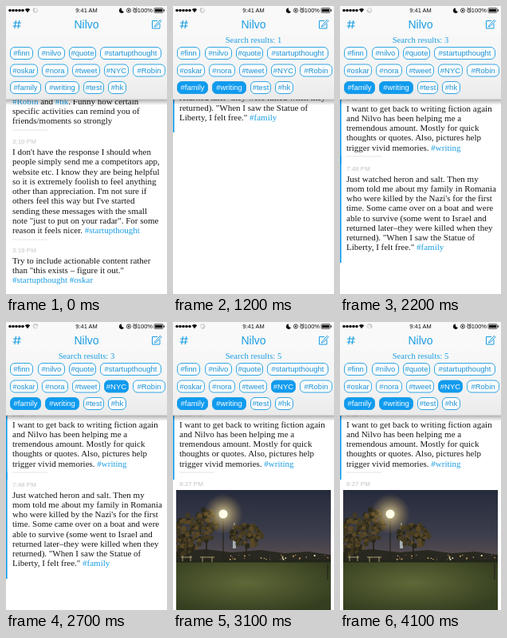
Recreate the animation shown at these times as an HTML page. Size 202 by 360 pixels, loop 4.2 s.

```html
<!DOCTYPE html>
<html lang="en">
<head>
<meta charset="utf-8">
<title>Tag search</title>
<style>
  html, body { margin: 0; width: 100%; height: 100%; overflow: hidden; background: #fff; }
  svg { display: block; width: 100vw; height: 100vh; }
  .body { font: 11px "Liberation Serif", serif; fill: #161616; }
  .time { font: 8px "Liberation Sans", sans-serif; fill: #c3c3c3; }
  .chip { font: 9.5px "Liberation Sans", sans-serif; text-anchor: middle; }
  .status { font: 7.5px "Liberation Sans", sans-serif; }
  .tag { fill: #1b9de2; }
</style>
</head>
<body>
<svg id="stage" viewBox="0 0 202 360">
  <defs>
    <linearGradient id="panel" x2="0" y2="1">
      <stop stop-color="#f8f8f8"/><stop offset=".6" stop-color="#f3f3f3"/><stop offset="1" stop-color="#eaeaea"/>
    </linearGradient>
    <linearGradient id="shade" x2="0" y2="1">
      <stop stop-color="#000" stop-opacity=".3"/><stop offset="1" stop-color="#000" stop-opacity="0"/>
    </linearGradient>
    <linearGradient id="sky" x2="0" y2="1">
      <stop stop-color="#262b3c"/><stop offset=".6" stop-color="#3b3d4b"/><stop offset="1" stop-color="#5c5050"/>
    </linearGradient>
    <radialGradient id="grass" cx=".45" cy=".45" r=".65">
      <stop stop-color="#5f6837"/><stop offset="1" stop-color="#343e20"/>
    </radialGradient>
    <radialGradient id="glow">
      <stop offset=".1" stop-color="#fffbe0"/><stop offset=".25" stop-color="#ffe9a0" stop-opacity=".75"/>
      <stop offset="1" stop-color="#d9a850" stop-opacity="0"/>
    </radialGradient>
    <clipPath id="photoClip"><path d="M4 210H198V360H4z"/></clipPath>
  </defs>

  <g id="feed"></g>
  <g id="familyOnly"></g>
  <g id="writing"></g>
  <g id="familyBelow"></g>
  <g id="photo">
    <g clip-path="url(#photoClip)">
      <path d="M4 210H198V300H4z" fill="url(#sky)"/>
      <path d="M4 287L40 284 75 288 110 285 140 289 170 287 198 291V302H4z" fill="#292820"/>
      <path d="M75 283V258L77 250 79 258V283z" fill="#a6aeb0"/>
      <g id="trees"></g>
      <path d="M4 298H198V360H4z" fill="url(#grass)"/>
      <path d="M4 299H198" stroke="#22251a" stroke-width="3"/>
      <g id="lights"></g>
      <path d="M63 239V298M194 302V322M18 270V298" stroke="#26231c" stroke-width="1.2"/>
      <circle cx="63" cy="240" r="25" fill="url(#glow)" opacity=".75"/>
      <circle cx="63" cy="240" r="5.5" fill="#fffce8"/>
      <path d="M10 294H24M34 294H52M12 292V299M22 292V299M37 294V300M49 294V300" stroke="#c7ba87" stroke-width=".8"/>
    </g>
  </g>

  <path d="M0 117H202V124H0z" fill="url(#shade)"/>
  <path d="M0 0H202V117H0z" fill="#f9f9f9"/>
  <path d="M0 35H202V117H0z" fill="url(#panel)"/>
  <path d="M0 116.5H202" stroke="#c5c5c5" stroke-width=".6"/>

  <g fill="#111">
    <circle cx="5" cy="5.5" r="1.8"/><circle cx="9" cy="5.5" r="1.8"/><circle cx="13" cy="5.5" r="1.8"/>
    <circle cx="17" cy="5.5" r="1.8"/><circle cx="21" cy="5.5" r="1.8"/>
    <path d="M23.8 4.2Q27 1.6 30.2 4.2L27 8.3z"/>
    <path d="M145 2.5A3.2 3.2 0 1 0 148 7A3.8 3.8 0 0 1 145 2.5z"/>
    <circle cx="154" cy="5.5" r="2.6" fill="none" stroke="#111" stroke-width=".8"/><circle cx="154" cy="5.5" r="1.1"/>
    <circle cx="162" cy="5.7" r="2.3" fill="none" stroke="#111" stroke-width=".8"/>
    <path d="M162 4V6H163.5M159.5 3L161 2M164.5 3L163 2" fill="none" stroke="#111" stroke-width=".7"/>
    <rect x="186" y="2.7" width="11" height="5.6" rx="1" fill="none" stroke="#111" stroke-width=".7"/>
    <path d="M187 3.7H196V7.3H187zM197.6 4.5H199V6.5H197.6z"/>
    <text class="status" x="101" y="8" text-anchor="middle">9:41 AM</text>
    <text class="status" x="184" y="8" text-anchor="end">100%</text>
  </g>
  <g id="spinner" stroke="#777" stroke-width=".7"></g>

  <text x="101" y="27.5" text-anchor="middle" class="tag" font-size="14" font-family="Liberation Sans, sans-serif">Nilvo</text>
  <g fill="none" stroke="#1b9de2" stroke-width="1.2">
    <path d="M12.5 18L10.8 28M16.8 18L15.1 28M9 21H19M8.5 25H18.5"/>
    <path d="M190 18.5H183.5V28H193V22M187 24.5L193.5 17.2L195 18.7L188.5 25.3L186.5 26z" stroke-width="1"/>
  </g>
  <text id="results" x="101" y="46.3" text-anchor="middle" class="tag" font-size="10.7" font-family="Liberation Serif, serif"></text>
  <g id="chips"></g>
</svg>

<script>
const byId = id => document.getElementById(id);
const LOOP = 4200, BLUE = "#109bef", LEADING = 12.25;

function add(parent, name, attrs, text = "") {
  const node = document.createElementNS("http://www.w3.org/2000/svg", name);
  for (const key in attrs) node.setAttribute(key, attrs[key]);
  node.textContent = text;
  parent.append(node);
  return node;
}

function addNote(group, time, y, lines) {
  if (time) add(group, "text", { class: "time", x: 8, y: y - 14 }, time);
  lines.forEach((line, i) => {
    const row = add(group, "text", { class: "body", x: 8, y: y + i * LEADING });
    for (const part of line.split(/(#\w+)/))
      add(row, "tspan", part[0] === "#" ? { class: "tag" } : {}, part);
  });
}

const addRule = (group, y) => add(group, "path", { d: `M8 ${y}H52`, stroke: "#ddd", "stroke-width": .8 });
const addBar = (group, top, bottom) => add(group, "path", { d: `M0 ${top}H1.6V${bottom}H0z`, fill: BLUE });

const familyNote = [
  "Just watched heron and salt. Then my",
  "mom told me about my family in Romania",
  "who were killed by the Nazi's for the first",
  "time. Some came over on a boat and were",
  "able to survive (some went to Israel and",
  "returned later–they were killed when they",
  "returned). \"When I saw the Statue of",
  "Liberty, I felt free.\" #family"
];

const feed = byId("feed");
addNote(feed, "", 122.5, [
  "#Robin and #hk. Funny how certain",
  "specific activities can remind you of",
  "friends/moments so strongly"
]);
addRule(feed, 155);
addNote(feed, "3:10 PM", 186, [
  "I don't have the response I should when",
  "people simply send me a competitors app,",
  "website etc. I know they are being helpful",
  "so it is extremely foolish to feel anything",
  "other than appreciation. I'm not sure if",
  "others feel this way but I've started",
  "sending these messages with the small",
  "note \"just to put on your radar\". For some",
  "reason it feels nicer. #startupthought"
]);
addRule(feed, 292);
addNote(feed, "3:19 PM", 321.5, [
  "Try to include actionable content rather",
  "than \"this exists – figure it out.\"",
  "#startupthought #oskar"
]);

addBar(byId("familyOnly"), 40, 158);
addNote(byId("familyOnly"), "", 57, familyNote);

const writing = byId("writing");
addBar(writing, 100, 197);
addNote(writing, "3:13 PM", 131.5, [
  "I want to get back to writing fiction again",
  "and Nilvo has been helping me a",
  "tremendous amount. Mostly for quick",
  "thoughts or quotes. Also, pictures help",
  "trigger vivid memories. #writing"
]);
addRule(writing, 188);

addBar(byId("familyBelow"), 188, 321);
addNote(byId("familyBelow"), "7:48 PM", 219.5, familyNote);
add(byId("photo"), "text", { class: "time", x: 8, y: 205 }, "8:27 PM");

// Night park: leaf clusters and distant lamps
let seed = 7;
const random = () => (seed = seed * 16807 % 2147483647) / 2147483647;
const leafColors = ["#292719", "#3d351f", "#594827", "#463c22"];
function addTree(cx, cy, rx, ry, count) {
  add(byId("trees"), "path", { d: `M${cx} ${cy}V299`, stroke: "#28231a", "stroke-width": 1.8 });
  for (let i = 0; i < count; i++) {
    const angle = random() * 2 * Math.PI, reach = Math.sqrt(random());
    add(byId("trees"), "circle", {
      cx: cx + Math.cos(angle) * reach * rx, cy: cy + Math.sin(angle) * reach * ry,
      r: 1 + random() * 2.5, fill: leafColors[i % 4]
    });
  }
}
addTree(20, 264, 17, 23, 110);
addTree(42, 254, 14, 20, 90);
addTree(92, 266, 20, 14, 95);
addTree(12, 282, 14, 12, 45);
for (let i = 0; i < 32; i++)
  add(byId("lights"), "circle", {
    cx: 70 + random() * 126, cy: 291 + random() * 6, r: .3 + random() * .7,
    fill: i % 3 ? "#d8b36b" : "#f4e9c8"
  });

const chipRows = [
  [59, ["#finn", 5, 29], ["#nilvo", 40, 34], ["#quote", 79, 34], ["#startupthought", 118, 77]],
  [80.5, ["#oskar", 5, 35], ["#nora", 45, 33], ["#tweet", 83, 35], ["#NYC", 123, 31], ["#Robin", 159, 41]],
  [102, ["#family", 5, 39], ["#writing", 49, 43], ["#test", 97, 26], ["#hk", 128, 23]]
];
const pressTimes = { "#family": 200, "#writing": 900, "#NYC": 2500 };
const chips = [];
for (const [y, ...row] of chipRows)
  for (const [name, x, width] of row) {
    const box = add(byId("chips"), "rect", { x: x + .5, y: y - 7.5, width: width - 1, height: 15, rx: 5.5, stroke: "#1b9de2", "stroke-width": .9 });
    const label = add(byId("chips"), "text", { class: "chip", x: x + width / 2, y: y + 3.2 }, name);
    chips.push({ box, label, pressed: pressTimes[name] ?? Infinity });
  }

const spokes = Array.from({ length: 12 }, (_, i) =>
  add(byId("spinner"), "path", { d: "M37 3.6V1.9", transform: `rotate(${i * 30} 37 5.3)` }));

const show = (id, opacity) => byId(id).setAttribute("opacity", opacity);
const fade = (t, start, end) => Math.min(1, Math.max(0, (t - start) / (end - start)));

function draw(now) {
  const t = Math.floor(now % LOOP / 100) * 100;
  const first = fade(t, 300, 500), second = fade(t, 1200, 1500), third = fade(t, 2700, 3000);
  show("feed", 1 - first);
  show("familyOnly", first * (1 - second));
  show("writing", second);
  show("familyBelow", second * (1 - third));
  show("photo", third);
  show("results", first);
  byId("results").textContent = "Search results: " + (t < 1400 ? 1 : t < 2900 ? 3 : 5);
  for (const { box, label, pressed } of chips) {
    box.setAttribute("fill", t >= pressed ? BLUE : "#fcfcfc");
    label.setAttribute("fill", t >= pressed ? "#fff" : "#1b93d6");
  }
  spokes.forEach((spoke, i) => spoke.setAttribute("opacity", .2 + .8 * ((i - t / 100 + 48) % 12) / 12));
}

const start = performance.now();
function tick() {
  draw(performance.now() - start);
  requestAnimationFrame(tick);
}
tick();
</script>
</body>
</html>
```
